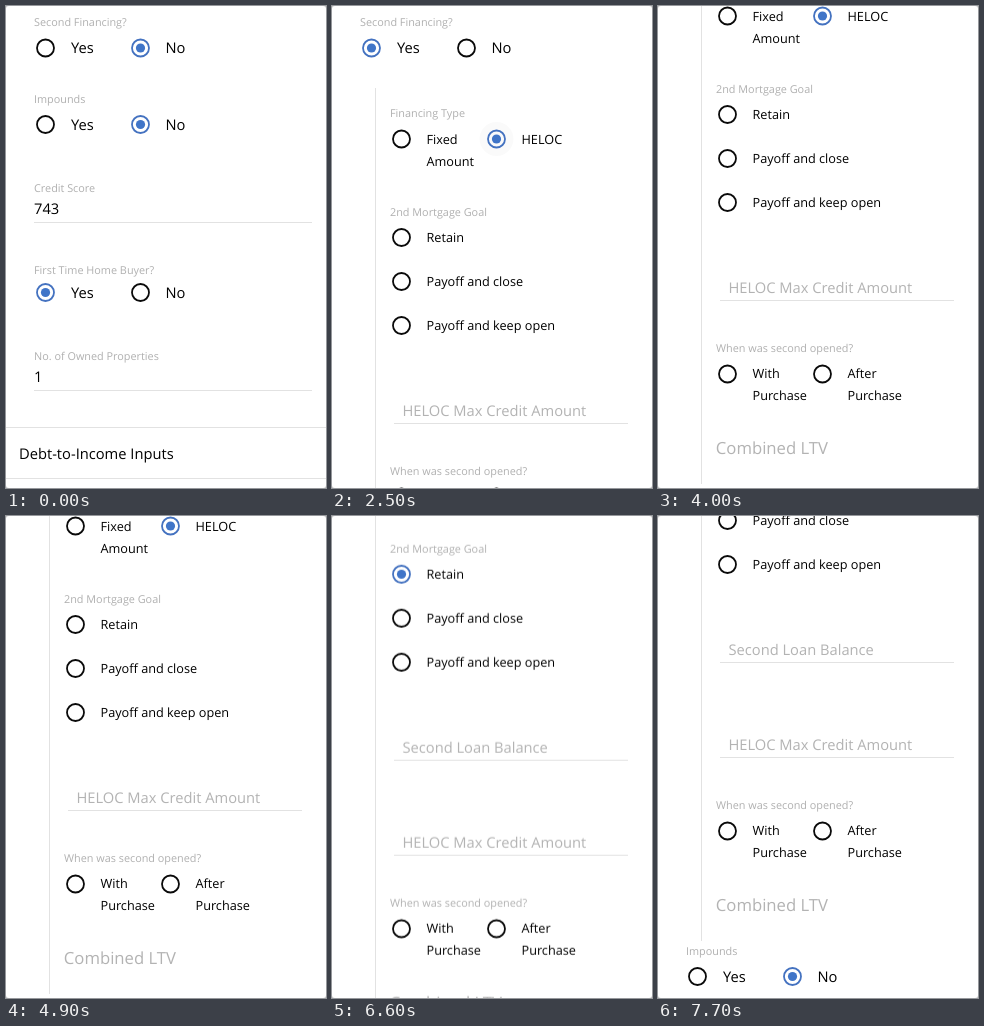
Recreate the animation shown at these times as an HTML page. Size 320x482 px, loop 8000 ms.

```html
<!DOCTYPE html>
<html lang="en">
<head>
<meta charset="utf-8">
<title>Loan form</title>
<style>
  html, body { margin: 0; width: 100%; height: 100%; overflow: hidden; background: #c4c4c4; }
  svg { display: block; width: 320px; height: 482px; background: #fff; border-radius: 3px; }
  text {
    font-family: "Open Sans", "Noto Sans", sans-serif; font-size: 14.7px; fill: #000;
    text-rendering: geometricPrecision;
  }
  .label { font-size: 10.85px; fill: #b0b0b0; }
  .option { font-size: 12.7px; }
  .hint { fill: #b3b3b3; }
  .big { font-size: 16.7px; }
  .rule { stroke: #e2e2e2; }

  .radio { stroke: #0a0a0a; fill: transparent; stroke-width: 1.8px; }
  .on { stroke: #4472c0; fill: #4075c8; }
  .ripple { fill: #000; fill-opacity: .06; opacity: 0; }

  /* Percentages are of the 8 s loop; state changes are hard. */
  .step { animation: 8s step-end infinite; }
  .pick-second { animation-name: select-second; }
  .drop-second { animation-name: unselect-second; }
  .pick-heloc { animation-name: select-heloc; }
  .pick-retain { animation-name: select-retain; }
  .panel { animation-name: show-panel; }
  .limit { animation-name: place-limit; }
  .balance { animation-name: show-balance; }
  .tail { animation-name: move-tail; }
  .after { animation-name: move-after; }
  .page { animation: scroll 8s linear infinite; }
  .ripple-heloc { transform-origin: 164.5px 133px; animation: ripple-heloc 8s linear infinite; }
  .ripple-retain { transform-origin: 69.5px 231.5px; animation: ripple-retain 8s linear infinite; }

  @keyframes select-second { 1.25%, 100% { stroke: #4472c0; fill: #4075c8; } }
  @keyframes unselect-second { 1.25%, 100% { stroke: #0a0a0a; fill: transparent; } }
  @keyframes select-heloc { 27.5%, 100% { stroke: #4472c0; fill: #4075c8; } }
  @keyframes select-retain { 67.5%, 100% { stroke: #4472c0; fill: #4075c8; } }
  @keyframes show-panel { 0% { opacity: 0; } 1.25%, 100% { opacity: 1; } }
  @keyframes place-limit {
    0% { opacity: 0; transform: none; }
    27.5% { opacity: 1; transform: none; }
    67.5%, 100% { opacity: 1; transform: translateY(95px); }
  }
  @keyframes show-balance { 0% { opacity: 0; } 67.5%, 100% { opacity: 1; } }
  @keyframes move-tail {
    0% { transform: none; }
    27.5% { transform: translateY(95px); }
    67.5%, 100% { transform: translateY(190px); }
  }
  @keyframes move-after {
    0% { transform: none; }
    1.25% { transform: translateY(423px); }
    27.5% { transform: translateY(518px); }
    67.5%, 100% { transform: translateY(613px); }
  }
  @keyframes scroll {
    0%, 32% { transform: none; }
    33.75% { transform: translateY(-25px); }
    35% { transform: translateY(-60px); }
    36.25% { transform: translateY(-88px); }
    37.5% { transform: translateY(-103px); }
    40% { transform: translateY(-114px); }
    46.25% { transform: translateY(-122px); }
    50%, 79% { transform: translateY(-123px); }
    80% { transform: translateY(-130px); }
    81.25% { transform: translateY(-149px); }
    82.5% { transform: translateY(-173px); }
    83.75% { transform: translateY(-198px); }
    85% { transform: translateY(-217px); }
    87.5% { transform: translateY(-245px); }
    90% { transform: translateY(-262px); }
    93.75%, 100% { transform: translateY(-271px); }
  }
  @keyframes ripple-heloc {
    0%, 27.49% { opacity: 0; transform: scale(.3); }
    27.5% { opacity: 1; transform: scale(.3); }
    30% { opacity: 1; transform: none; }
    31.25% { opacity: .4; transform: none; }
    33%, 100% { opacity: 0; transform: none; }
  }
  @keyframes ripple-retain {
    0%, 67.49% { opacity: 0; transform: scale(.3); }
    67.5% { opacity: 1; transform: scale(.3); }
    71.5%, 79% { opacity: 1; transform: none; }
    80%, 100% { opacity: 0; transform: none; }
  }
</style>
</head>
<body>
<svg viewBox="0 0 320 482">
  <defs>
    <g id="radio">
      <circle r="8.5" fill="none"/>
      <circle r="4.6" stroke="none"/>
    </g>
  </defs>

  <g class="page">
    <text class="label" x="28" y="20">Second Financing?</text>
    <use href="#radio" class="radio step pick-second" x="39.5" y="42"/>
    <text x="65" y="47">Yes</text>
    <use href="#radio" class="radio on step drop-second" x="134.5" y="42"/>
    <text x="159.5" y="47">No</text>

    <g class="step panel">
      <path class="rule" d="M43.5 82V380"/>
      <text class="label" x="58" y="111">Financing Type</text>
      <use href="#radio" class="radio" x="69.5" y="133"/>
      <text class="option" x="94.5" y="137.5">Fixed</text>
      <text class="option" x="94.5" y="159.5">Amount</text>
      <circle class="ripple ripple-heloc" cx="164.5" cy="133" r="17"/>
      <use href="#radio" class="radio step pick-heloc" x="164.5" y="133"/>
      <text class="option" x="189.5" y="137.5">HELOC</text>

      <text class="label" x="58" y="210">2nd Mortgage Goal</text>
      <circle class="ripple ripple-retain" cx="69.5" cy="231.5" r="17"/>
      <use href="#radio" class="radio step pick-retain" x="69.5" y="231.5"/>
      <text class="option" x="94.5" y="236">Retain</text>
      <use href="#radio" class="radio" x="69.5" y="275.5"/>
      <text class="option" x="94.5" y="280">Payoff and close</text>
      <use href="#radio" class="radio" x="69.5" y="319.5"/>
      <text class="option" x="94.5" y="324">Payoff and keep open</text>

      <g class="step balance">
        <text class="hint" x="70.5" y="410">Second Loan Balance</text>
        <path class="rule" d="M62 417.5H296"/>
      </g>
      <g class="step limit">
        <text class="hint" x="70.5" y="410">HELOC Max Credit Amount</text>
        <path class="rule" d="M62 417.5H296"/>
      </g>

      <g class="step tail">
        <path class="rule" d="M43.5 180V506"/>
        <text class="label" x="58" y="374">When was second opened?</text>
        <use href="#radio" class="radio" x="69.5" y="396"/>
        <text class="option" x="94.5" y="400">With</text>
        <text class="option" x="94.5" y="422">Purchase</text>
        <use href="#radio" class="radio" x="164.5" y="396"/>
        <text class="option" x="189.5" y="400">After</text>
        <text class="option" x="189.5" y="422">Purchase</text>
        <text class="hint big" x="57.8" y="475.5">Combined LTV</text>
      </g>
    </g>

    <g class="step after">
      <text class="label" x="28" y="97">Impounds</text>
      <use href="#radio" class="radio" x="39.5" y="118.5"/>
      <text x="65" y="123.5">Yes</text>
      <use href="#radio" class="radio on" x="134.5" y="118.5"/>
      <text x="159.5" y="123.5">No</text>

      <text class="label" x="28" y="186">Credit Score</text>
      <text x="28" y="208">743</text>
      <path class="rule" d="M28 216.5H306"/>

      <text class="label" x="28" y="268">First Time Home Buyer?</text>
      <use href="#radio" class="radio on" x="39.5" y="286.5"/>
      <text x="65" y="291.5">Yes</text>
      <use href="#radio" class="radio" x="134.5" y="286.5"/>
      <text x="159.5" y="291.5">No</text>

      <text class="label" x="28" y="354">No. of Owned Properties</text>
      <text x="28" y="376">1</text>
      <path class="rule" d="M28 384.5H306"/>

      <path class="rule" d="M0 421.5H320M0 472.5H320"/>
      <text x="13" y="453">Debt-to-Income Inputs</text>
    </g>
  </g>
</svg>
</body>
</html>
```
